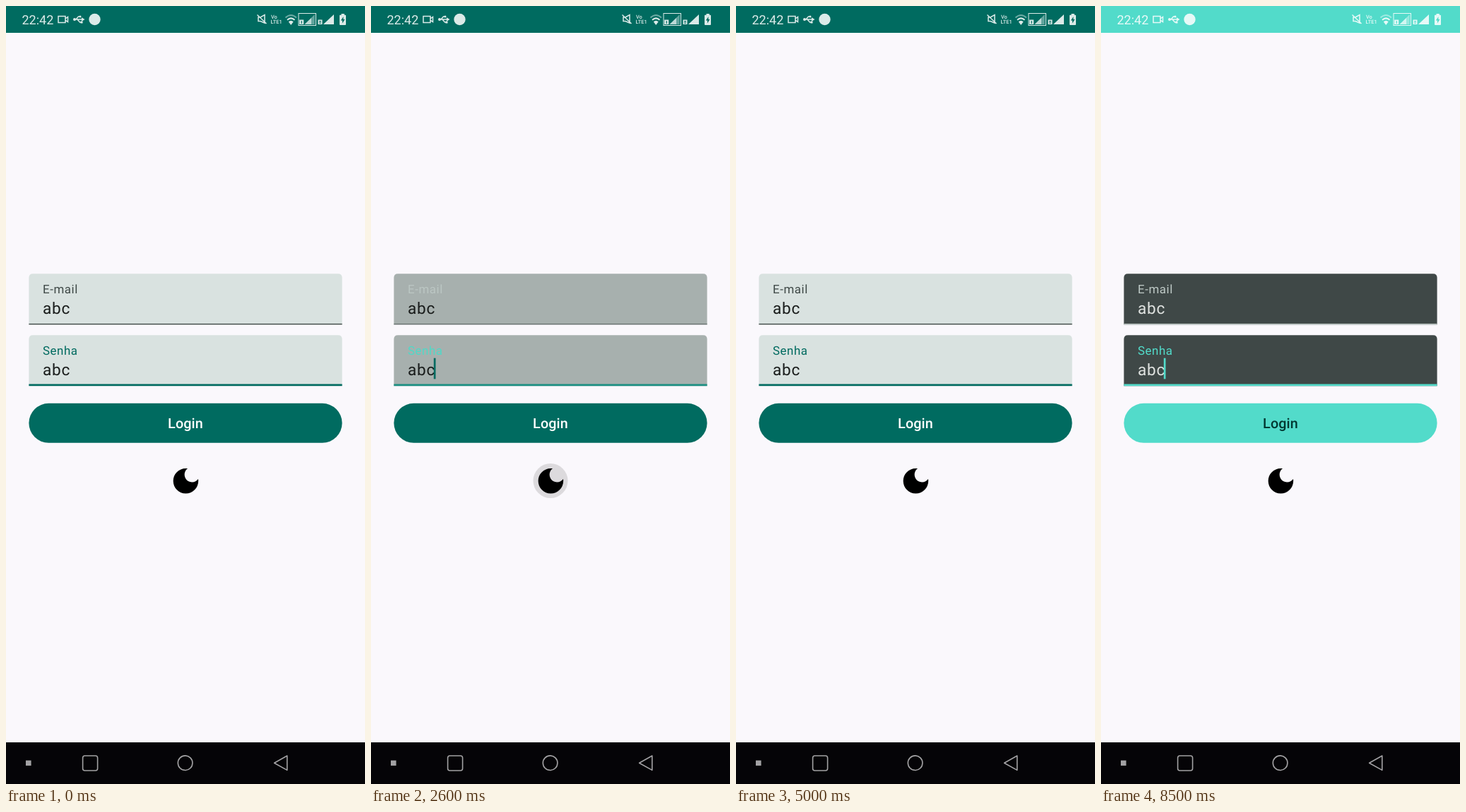
Animation of 508x1102 px, one loop 8.9 s. Source, as an HTML page:

```html
<!DOCTYPE html>
<html lang="pt">
<head>
<meta charset="utf-8">
<title>Login</title>
<style>
  html, body { margin: 0; width: 100%; height: 100%; overflow: hidden; background: #faf8fc; }
  svg { display: block; width: 508px; height: 1102px; }
  text { font-family: Roboto, sans-serif; text-rendering: geometricPrecision; }
  .accent { fill: var(--accent); }
  .field { fill: var(--field); }
  .input { fill: var(--text); font-size: 22.6px; letter-spacing: .7px; }
  .label { font-size: 16.9px; letter-spacing: .56px; }
  .login { fill: var(--on); font-size: 19.75px; font-weight: 500; letter-spacing: .14px; text-anchor: middle; }
  .status { fill: #fff; stroke: none; opacity: .86; }
  .line { fill: none; stroke: #fff; stroke-width: 1.5; }
  .tiny { font-size: 7.4px; font-weight: 500; }
  .nav { fill: none; stroke: #a3a2a4; stroke-width: 1.6; }
</style>
</head>
<body>
<svg id="stage" viewBox="0 0 508 1102">
  <rect width="508" height="1102" fill="#faf8fc"/>
  <rect class="accent" width="508" height="38"/>

  <g class="status">
    <text x="22.5" y="26" font-size="18">22:42</text>
    <path class="line" d="M74 14.5H84V23.5H74ZM84 18L87.5 15.5V22.5L84 20"/>
    <path class="line" d="M96 19H108M99 19L102.5 15H105M101 19L104.5 23H107"/>
    <path d="M107 16.3L111.5 19L107 21.7Z"/>
    <circle cx="97" cy="19" r="2"/>
    <circle cx="105" cy="15" r="1.5"/>
    <rect x="105.5" y="21.5" width="3" height="3"/>
    <circle cx="125.5" cy="19" r="8.2"/>

    <path class="line" stroke-width="1.2" d="M357 16H360L366 12.5V24L360 21.5H357ZM355.5 12.5L368.5 25"/>
    <text class="tiny" x="375" y="18">Vo</text>
    <text class="tiny" x="374.5" y="25.3" textLength="">LTE1</text>
    <g fill="none" stroke="#fff" stroke-width="2">
      <path opacity=".5" d="M395.5 16.5Q403.2 9.5 411 16.5"/>
      <path d="M398 19.7Q403.2 15 408.5 19.7"/>
    </g>
    <path d="M399.8 22.2Q403.2 19.2 406.7 22.2L403.2 27Z"/>

    <rect class="line" x="414" y="10.5" width="24.5" height="17" style="stroke-width:1"/>
    <rect x="415.2" y="19.5" width="6" height="6.5"/>
    <path opacity=".45" d="M422.5 26L436.8 12V26Z"/>
    <path d="M422.5 26L432 17V26Z" opacity=".75"/>
    <rect x="441.5" y="19.5" width="6" height="6.5"/>
    <path d="M449 26L464 12V26Z"/>
    <path d="M474.5 11H478.8V12.8H480.2Q481 12.8 481 13.6V26Q481 27 480 27H473Q472 27 472 26V13.6Q472 12.8 472.8 12.8H474.5Z"/>
  </g>
  <g class="accent">
    <path d="M477.5 15L473.8 20.6H476V24.5L479.5 18.8H477.3Z"/>
    <path d="M417.7 21H418.9V25H417.7ZM443.2 21H445.8V22H443.2ZM443.2 22.6H445.8V23.5H443.2ZM443.2 24.2H445.8V25H443.2Z"/>
  </g>

  <path class="field" d="M32.4 451.3V384.8Q32.4 379.2 38 379.2H470Q475.6 379.2 475.6 384.8V451.3Z"/>
  <rect x="32.4" y="449.9" width="443.2" height="1.4" style="fill:var(--idle)"/>
  <text class="label" x="52" y="407" style="fill:var(--label)">E-mail</text>
  <text class="input" x="52" y="435.5">abc</text>

  <path class="field" d="M32.4 538.2V471.8Q32.4 466.2 38 466.2H470Q475.6 466.2 475.6 471.8V538.2Z"/>
  <rect x="32.4" y="535.5" width="443.2" height="2.7" style="fill:var(--active)"/>
  <text class="label" x="52" y="494" style="fill:var(--focus)">Senha</text>
  <text class="input" x="52" y="522.5">abc</text>
  <rect id="caret" class="accent" x="88.8" y="498.7" width="2.7" height="29.6"/>

  <rect class="accent" x="32.4" y="562.8" width="443.2" height="56" rx="28"/>
  <text class="login" x="254" y="598.4">Login</text>

  <circle id="ripple" cx="254" cy="672.5" r="0"/>
  <path transform="translate(230.7 649) scale(1.975)" d="M12 3c-4.97 0-9 4.03-9 9s4.03 9 9 9 9-4.03 9-9c0-.46-.04-.92-.1-1.36-.98 1.37-2.58 2.26-4.4 2.26-2.98 0-5.4-2.42-5.4-5.4 0-1.81.89-3.42 2.26-4.4C12.92 3.04 12.46 3 12 3z"/>

  <rect y="1043" width="508" height="59" fill="#050407"/>
  <rect x="28" y="1068.6" width="7.6" height="7.4" fill="#a3a2a4"/>
  <rect class="nav" x="108.6" y="1062" width="21" height="21" rx="3"/>
  <circle class="nav" cx="253.6" cy="1072.2" r="10.3"/>
  <path class="nav" stroke-linejoin="round" d="M379.6 1072.2L397.8 1062V1082.4Z"/>
</svg>
<script>
  const LOOP = 8900, STEP = 100;

  // Each tap: press, theme switch, ripple gone
  const taps = [
    [1340, 1515, 1800],
    [2240, 2535, 2900],
    [3340, 3635, 4000],
    [4350, 4635, 5000],
    [5440, 5752, 6000]
  ];
  const blinks = [500, 1000, 1500, 2000, 2500, 2900, 3400, 4000, 4500, 5000,
                  5500, 6000, 6500, 7000, 7500, 8000, 8500];

  // [light, dark]
  const colors = {
    accent: [[0, 107, 96], [82, 219, 202]],
    on: [[255, 255, 255], [0, 55, 49]],
    text: [[25, 28, 27], [224, 227, 225]],
    field: [[217, 226, 224], [63, 72, 71]],
    label: [[63, 73, 71], [190, 201, 198]]
  };

  const stage = document.getElementById('stage');
  const ripple = document.getElementById('ripple');
  const caret = document.getElementById('caret');
  const clamp = x => Math.max(0, Math.min(1, x));

  // cubic-bezier(.4, 0, .2, 1)
  function ease(x) {
    x = clamp(x);
    let lo = 0, hi = 1;
    for (let i = 0; i < 20; i++) {
      const u = (lo + hi) / 2, v = 1 - u;
      if (1.2 * u * v * v + .6 * u * u * v + u * u * u < x) lo = u; else hi = u;
    }
    return lo * lo * (3 - 2 * lo);
  }

  function paint(name, [light, dark], k) {
    const rgb = light.map((c, i) => Math.round(c + (dark[i] - c) * k));
    stage.style.setProperty('--' + name, `rgb(${rgb})`);
  }

  function draw(t) {
    const past = taps.filter(tap => tap[1] <= t);
    const dark = past.length % 2;
    const age = past.length ? t - past[past.length - 1][1] : LOOP;
    const shift = p => dark ? p : 1 - p;
    const fill = shift(ease(age / 150));
    const caption = shift(ease((age - 50) / 150));

    paint('accent', colors.accent, dark);
    paint('on', colors.on, dark);
    paint('text', colors.text, dark);
    paint('field', colors.field, fill);
    paint('idle', colors.label, fill);
    paint('active', colors.accent, fill);
    paint('label', colors.label, caption);
    paint('focus', colors.accent, caption);

    const tap = taps.find(([press, , end]) => t >= press && t < end);
    if (tap) {
      const held = t - tap[0];
      ripple.setAttribute('r', 15 + 9.5 * ease(held / 225));
      ripple.setAttribute('opacity', .12 * Math.min(clamp(held / 75), clamp((tap[2] - t) / 200)));
    } else {
      ripple.setAttribute('opacity', 0);
    }
    caret.setAttribute('opacity', blinks.filter(b => b <= t).length % 2);
  }

  const start = performance.now();
  function tick() {
    const t = (performance.now() - start) % LOOP;
    draw(Math.floor(t / STEP) * STEP);
    requestAnimationFrame(tick);
  }
  tick();
</script>
</body>
</html>
```
